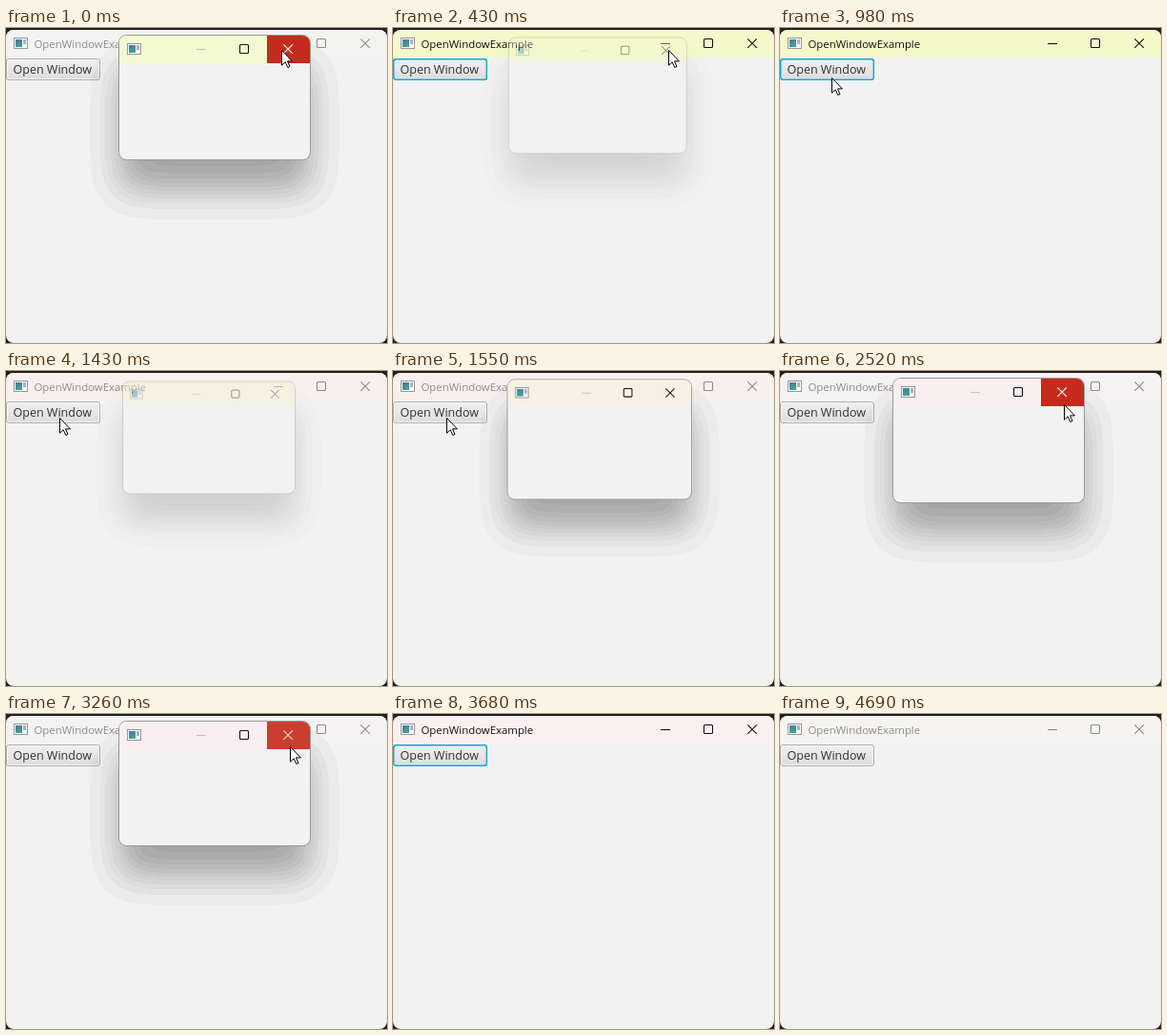
Recreate the animation shown at these times as an HTML page with a canvas. Size 400x331 px, loop 4.79 s.

```html
<!DOCTYPE html>
<html lang="en">
<head>
<meta charset="utf-8">
<title>Open window</title>
<style>
  html, body { margin: 0; width: 100%; height: 100%; overflow: hidden; background: #202020; }
  #stage { position: absolute; left: 0; top: 0; width: 400px; height: 331px; overflow: hidden; }
  #stage > *, #popup > * { position: absolute; left: 0; top: 0; width: 400px; height: 331px; }
  #popup { transform-origin: 159px 43px; }
  text { font-family: "Open Sans", "Noto Sans", sans-serif; }
  .line { fill: none; stroke: currentColor; stroke-width: 1.1; }
</style>
</head>
<body>
<div id="stage">
  <svg viewBox="0 0 400 331">
    <defs>
      <linearGradient id="face" x2="0" y2="1">
        <stop offset="0" stop-color="#f1f1f1"/>
        <stop offset="1" stop-color="#dcdcdc"/>
      </linearGradient>
      <linearGradient id="pane" x2=".4" y2="1">
        <stop offset="0" stop-color="#4c78a4"/>
        <stop offset="1" stop-color="#45a08c"/>
      </linearGradient>
      <clipPath id="mainClip"><rect y="2" width="400" height="329" rx="8"/></clipPath>
      <clipPath id="popupClip"><rect x="119" y="8" width="200" height="130" rx="7.5"/></clipPath>
      <g id="icon">
        <rect x=".5" y=".5" width="14" height="11" fill="#fafafa" stroke="#92989c"/>
        <rect x="2" y="2" width="7" height="8" fill="url(#pane)"/>
        <rect x="10" y="2" width="3" height="5" fill="#a9b4ba"/>
      </g>
      <path id="min" class="line" d="M0 5.5H10"/>
      <rect id="max" class="line" x=".5" y=".5" width="9" height="9" rx="1"/>
      <path id="close" class="line" d="M.3 .3 9.9 9.9M9.9 .3 .3 9.9"/>
    </defs>
    <g clip-path="url(#mainClip)">
      <rect y="2" width="400" height="329" fill="#f2f2f2"/>
      <rect id="mainBar" y="2" width="400" height="29"/>
    </g>
    <use href="#icon" x="8" y="10"/>
    <g id="mainInk">
      <text x="29.5" y="20.7" font-size="11.4" fill="currentColor">OpenWindowExample</text>
      <use href="#min" x="281" y="11"/>
      <use href="#max" x="326" y="11"/>
      <use href="#close" x="372" y="11"/>
    </g>
    <rect x=".5" y="32.5" width="98" height="22" rx="2.5" fill="url(#face)" stroke="#b0b0b0"/>
    <rect x="1.5" y="33.5" width="96" height="20" rx="2" fill="none" stroke="#fafafa" stroke-opacity=".7"/>
    <rect id="focus" x=".7" y="32.7" width="97.6" height="21.6" rx="2.5" fill="none" stroke="#14a6cf" stroke-width="1.5"/>
    <text x="7.5" y="48.2" font-size="12.5" fill="#333">Open Window</text>
  </svg>

  <div id="popup">
    <canvas id="shadow" width="400" height="331"></canvas>
    <svg viewBox="0 0 400 331">
      <rect x="118.5" y="7.5" width="201" height="131" rx="8" fill="#f2f2f2" stroke="#989898"/>
      <g clip-path="url(#popupClip)">
        <rect id="popupBar" x="119" y="8" width="200" height="29"/>
        <rect id="closeBg" x="274" y="8" width="45" height="29"/>
      </g>
      <use href="#icon" x="127" y="16"/>
      <use href="#min" x="200" y="17" color="#c4c4bd"/>
      <use href="#max" x="245" y="17" color="#111"/>
      <use id="closeInk" href="#close" x="291" y="17"/>
    </svg>
  </div>

  <svg viewBox="0 0 400 331">
    <path id="cursor" d="M.5 .5V16.2L4.2 12.8 6.8 18.5 9 17.5 6.5 11.9H11.4Z" fill="#fff" stroke="#000" stroke-linejoin="round"/>
  </svg>
</div>

<script>
const LOOP = 4790;
const $ = id => document.getElementById(id);

// Each track lists [start time, ...values]; a value holds until the next entry.
const tracks = {
  // title bar colour, active
  main: [
    [0, '#f3f3f2', false], [430, '#f5f8cb', true], [1430, '#f8f0ed', false],
    [1700, '#f4f2f2', false], [3410, '#fbf0f1', true], [4690, '#f6f4f1', false]
  ],
  // opacity, scale, title bar colour
  popup: [
    [0, 1, 1, '#f3f9d0'], [430, .4, .93, '#f3f9d0'], [550, 0, 1, '#f3f9d0'],
    [1430, .45, .9, '#f6f4d8'], [1550, .97, .9625, '#f7f1e4'],
    [1700, 1, 1, '#f9eef0'], [3410, 0, 1, '#f9eef0']
  ],
  // close button background, cross colour
  close: [
    [0, '#c42b1c', '#fff'], [280, '#c93e2f', '#f3d5d1'], [430, 'none', '#111'],
    [2520, '#c42b1c', '#fff'], [3260, '#c93e2f', '#f3d5d1'], [3410, 'none', '#111']
  ],
  cursor: [
    [0, 289, 23], [700, 205, 38], [830, 98, 58], [980, 54, 52], [1130, 54, 51],
    [1280, 56, 49], [1980, 104, 52], [2100, 170, 55], [2220, 243, 56],
    [2370, 293, 41], [2520, 298, 35], [2670, 298, 34], [3680, -40, -40]
  ]
};

function at(name, t) {
  let step = tracks[name][0];
  for (const s of tracks[name]) if (s[0] <= t) step = s;
  return step.slice(1);
}

// Blurred box shadow, cut into flat bands of grey.
function paintShadow() {
  const ctx = $('shadow').getContext('2d');
  const img = ctx.createImageData(400, 331);
  const sigma = 18, peak = .33, band = 7 / 242;
  const phi = z => 1 / (1 + Math.exp(-1.5976 * z - .07056 * z ** 3));
  const span = (v, a, b) => phi((v - a) / sigma) - phi((v - b) / sigma);
  for (let y = 0; y < 331; y++) {
    const fy = span(y + .5, 40, 170);
    for (let x = 0; x < 400; x++) {
      const alpha = peak * fy * span(x + .5, 119, 319);
      img.data[(y * 400 + x) * 4 + 3] = 255 * band * Math.round(alpha / band);
    }
  }
  ctx.putImageData(img, 0, 0);
}

function render(t) {
  const [bar, active] = at('main', t);
  $('mainBar').setAttribute('fill', bar);
  $('mainInk').style.color = active ? '#111' : '#8c8c8c';
  $('focus').style.opacity = active ? 1 : 0;

  const [opacity, scale, popupBar] = at('popup', t);
  $('popup').style.opacity = opacity;
  $('popup').style.transform = `scale(${scale})`;
  $('popupBar').setAttribute('fill', popupBar);

  const [bg, ink] = at('close', t);
  $('closeBg').setAttribute('fill', bg);
  $('closeInk').style.color = ink;

  $('cursor').setAttribute('transform', `translate(${at('cursor', t)})`);
}

paintShadow();
const start = performance.now();
function tick() {
  render((performance.now() - start) % LOOP);
  requestAnimationFrame(tick);
}
tick();
</script>
</body>
</html>
```
